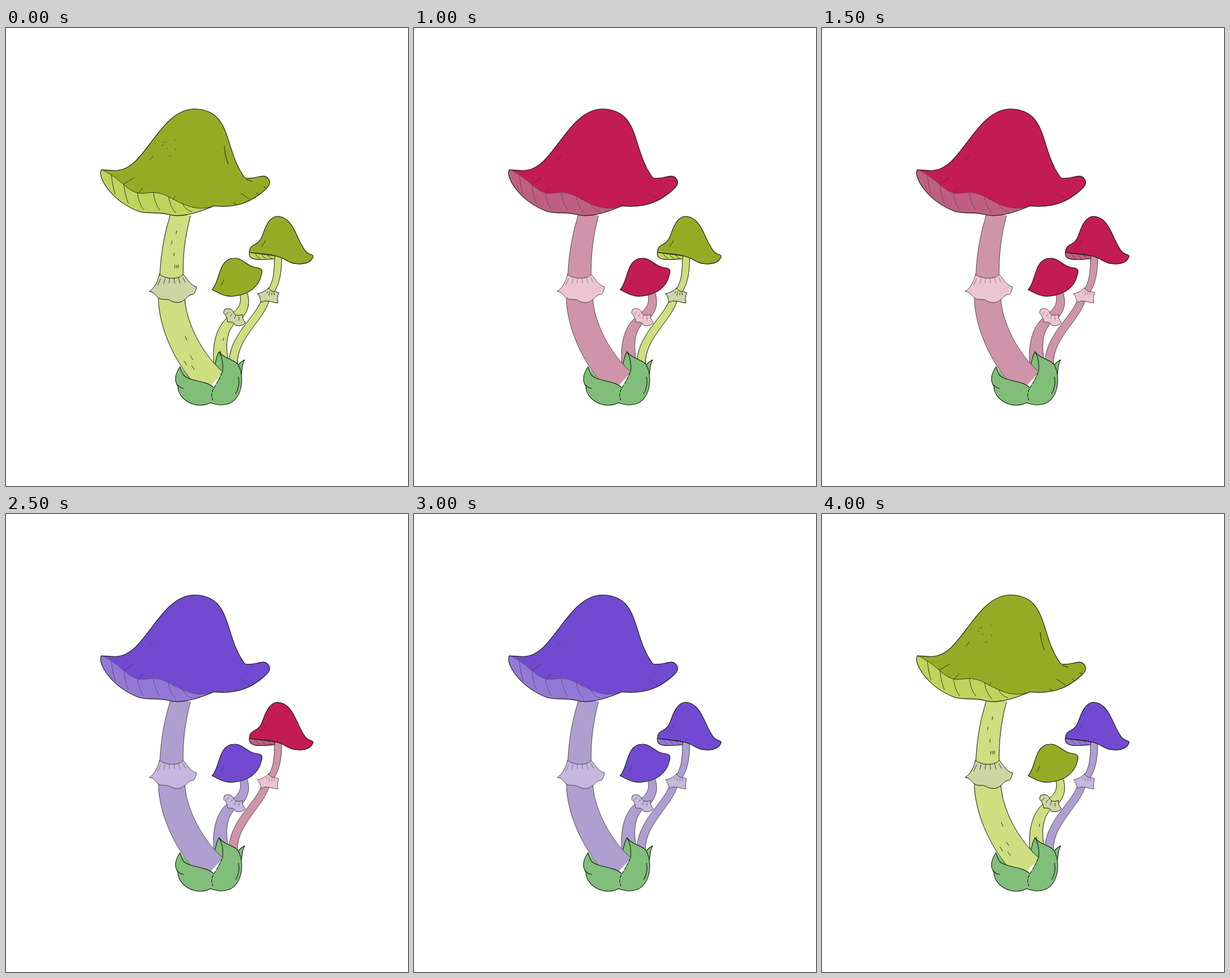
These frames come from a looping animation (702 px wide and 798 px high, 4500 ms). An HTML page:

```html
<!DOCTYPE html>
<html lang="en">
<head>
<meta charset="utf-8">
<title>Colour-changing mushrooms</title>
<style>
  html, body { margin: 0; width: 100%; height: 100%; overflow: hidden; background: #fff; }
  svg { display: block; width: 100%; height: 100%; }
  path { fill: none; stroke-linecap: round; stroke-linejoin: round; }
  .cap { fill: var(--cap); }
  .gills { fill: var(--gills); }
  .stem { fill: var(--stem); }
  .ring { fill: var(--ring); }
  .leaf { fill: #80be79; }
  .line, .side, .soft, .fine { stroke: #14180f; }
  .line { stroke-width: 1.1; }
  .side { stroke-width: var(--side); }
  .soft { stroke-width: .8; opacity: var(--soft); }
  .fine { stroke-width: .9; opacity: var(--fine); }
  .broken { stroke-dasharray: 5 3; }
</style>
</head>
<body>
<svg viewBox="0 0 702 798">
  <g id="right"></g>
  <g id="middle"></g>
  <g id="leavesBack"></g>
  <g id="big"></g>
  <g id="leavesFront"></g>
</svg>
<script>
const byId = id => document.getElementById(id);
const mix = (a, b, t) => a + (b - a) * t;

let seed = 7;
const random = () => (seed = seed * 16807 % 2147483647) / 2147483647;

function draw(group, cls, d) {
  const path = document.createElementNS('http://www.w3.org/2000/svg', 'path');
  path.setAttribute('class', cls);
  path.setAttribute('d', d);
  byId(group).append(path);
  return path;
}

// Tapered stalk around a curved spine; only its two sides are inked.
function stalk(group, spine, startWidth, endWidth, flecks) {
  const guide = draw(group, '', spine);
  const length = guide.getTotalLength();
  const at = (t, across) => {
    const a = guide.getPointAtLength(length * Math.max(0, t - .01));
    const b = guide.getPointAtLength(length * Math.min(1, t + .01));
    const p = guide.getPointAtLength(length * t);
    const reach = across * mix(startWidth, endWidth, t) / 2 / Math.hypot(b.x - a.x, b.y - a.y);
    return [p.x + (b.y - a.y) * reach, p.y - (b.x - a.x) * reach].map(v => v.toFixed(1));
  };
  const side = across => Array.from({ length: 25 }, (_, i) => at(i / 24, across));
  const left = side(-1), right = side(1);
  draw(group, 'stem', `M${left.join('L')}L${right.reverse().join('L')}Z`);
  draw(group, 'side', `M${left.join('L')}M${right.join('L')}`);
  for (let i = 0; i < flecks; i++) {
    const t = mix(.2, .85, random()), across = mix(-.7, .7, random());
    draw(group, 'fine', `M${at(t, across)}L${at(t + .045, across)}`);
  }
}

// Short folds along the top edge of a ring, fanning out from an apex.
function pleats(group, count, [ax, ay], [bx, by], [apexX, apexY], length) {
  for (let i = 0; i < count; i++) {
    const x = mix(ax, bx, i / (count - 1)), y = mix(ay, by, i / (count - 1));
    const reach = length * mix(.6, 1.1, random()) / Math.hypot(x - apexX, y - apexY);
    draw(group, 'soft', `M${x},${y}l${(x - apexX) * reach},${(y - apexY) * reach}`);
  }
}

// Right mushroom
stalk('right', 'M453,474C442,508 394,540 397,588', 13, 15, 0);
stalk('right', 'M475,397C475,422 474,440 463,458', 13, 11, 0);
draw('right', 'ring side', 'M458,453C453,459 447,461 439,463C444,468 444,474 446,478C456,472 464,479 475,479C473,470 475,466 476,461L469,459Q463,460 458,453Z');
pleats('right', 4, [457, 459], [468, 461], [465, 445], 6);
draw('right', 'gills line', 'M425,391C423,405 440,405 469,402L470,397Z');
for (let x = 435; x < 460; x += 10) draw('right', 'soft', `M${x},393q3,6 9,9`);
draw('right', 'cap line', 'M425,391C426,372 441,384 449,358C456,338 463,329 474,328C504,329 508,374 525,391C529,395 538,394 536,399C531,413 505,415 488,404C472,394 450,394 425,391Z');
draw('right', 'soft', 'M446,381Q451,376 453,370');

// Middle mushroom
stalk('middle', 'M395,508C376,524 370,552 377,592', 16, 27, 2);
stalk('middle', 'M415,464C420,482 412,494 403,502', 13, 18, 0);
draw('middle', 'ring side', 'M382,490C392,487 396,491 398,497C402,502 408,501 413,499C412,507 416,509 418,514C412,520 406,519 401,518C398,511 392,513 387,512C386,503 383,500 380,497Z');
pleats('middle', 4, [389, 495], [407, 503], [408, 480], 7);
draw('middle', 'cap line', 'M360,456C374,442 370,402 398,401C414,400 420,416 440,418C448,419 448,424 446,430C442,450 425,463 405,466C385,471 372,462 360,456Z');
draw('middle', 'soft', 'M375,449Q379,444 380,439');

draw('leavesBack', 'leaf line', 'M405,588C409,582 413,580 417,578C411,588 413,594 411,603');
draw('leavesBack', 'leaf', 'M372,564C366,574 367,582 364,587L378,603L385,575Z');
draw('leavesBack', 'line', 'M372,564C366,574 367,582 364,587');
draw('leavesBack', 'leaf', 'M304,590L330,622L309,606Z');

// Big mushroom
stalk('big', 'M289,466C289,515 318,578 362,618', 46, 50, 4);
stalk('big', 'M306,322C296,355 289,392 289,436', 34, 41, 6);
draw('big', 'ring side', 'M268,429C264,445 258,454 250,459C262,460 262,473 275,473C288,471 288,480 303,478C318,473 315,465 327,464C329,464 332,456 333,451C322,449 317,437 309,429C303,439 277,438 268,429Z');
pleats('big', 6, [270, 437], [309, 435], [289, 395], 12);

const underside = 'M167,247C158,255 180,300 233,320C250,324 265,320 285,325C305,331 335,322 363,310';
const dome = 'M167,247C175,247 185,249 195,248C244,245 268,141 330,141C396,143 380,212 417,261C436,266 450,250 459,264C463,270 458,277 452,282C428,304 402,314 363,310';
const rim = 'C330,322 306,305 280,292C262,284 254,287 240,288C214,291 203,262 167,247';
draw('big', 'gills', underside + rim);
draw('big', 'cap', dome + rim);
const lower = draw('big', 'line', underside);
const upper = draw('big', 'soft', 'M363,310' + rim);
draw('big', 'line', dome);

// Gills lean from the rim towards the underside.
const along = (path, t) => path.getPointAtLength(path.getTotalLength() * t);
for (let i = 0; i < 6; i++) {
  const a = along(upper, .91 - .13 * i), b = along(lower, .24 + .12 * i);
  const x = mix(a.x, b.x, .85), y = mix(a.y, b.y, .85);
  draw('big', 'soft', `M${a.x},${a.y}Q${a.x + 2},${mix(a.y, y, .6)} ${x},${y}`);
}

draw('big', 'soft', 'M251,230L257,223M205,272Q214,267 223,261M231,287L239,279M292,299L295,293M410,288L425,298');
draw('big', 'fine', 'M381,206Q382,222 388,237M398,304L402,308M437,287L442,291M450,277L454,278M420,264L430,267');
for (let i = 0; i < 9; i++) {
  draw('big', 'fine', `M${mix(258, 298, random())},${mix(192, 226, random())}l1,1`);
}

draw('leavesFront', 'leaf', 'M304,590C293,606 295,616 300,624C301,650 334,665 357,653L363,627C350,613 322,617 310,605Z');
draw('leavesFront', 'line', 'M363,627C350,613 322,617 310,605Q306,599 304,590C293,606 295,616 300,624C301,650 334,665 357,653M300,622Q303,627 310,628');
draw('leavesFront', 'leaf', 'M372,564C382,578 399,576 406,588C419,612 412,672 357,653Q359,640 363,627C380,598 383,580 372,564Z');
draw('leavesFront', 'line', 'M378,600C380,584 378,574 372,564C382,578 399,576 406,588C419,612 412,672 357,653M406,608Q409,624 401,637');
draw('leavesFront', 'line broken', 'M377,601Q373,612 363,627Q357,638 361,648');

const palettes = {
  green:  { cap: '#96ab25', gills: '#bfd45c', stem: '#cede80', ring: '#cdd5a5', side: 1, soft: 1, fine: 1 },
  red:    { cap: '#c31b54', gills: '#be5f82', stem: '#cf94a9', ring: '#ecc5d2', side: .7, soft: .5, fine: 0 },
  purple: { cap: '#714ad1', gills: '#9478d5', stem: '#ad9fd0', ring: '#c5b7de', side: .7, soft: .5, fine: 0 }
};
const colours = Object.keys(palettes);
const mushrooms = ['big', 'middle', 'right'];
const stepTime = 500;
const stepCount = colours.length * mushrooms.length;

function paint(id, name) {
  for (const [key, value] of Object.entries(palettes[name])) byId(id).style.setProperty('--' + key, value);
}

let shown = -1;
const start = performance.now();
function tick() {
  const step = Math.floor((performance.now() - start) / stepTime) % stepCount;
  if (step !== shown) {
    shown = step;
    // Each mushroom takes the next colour one step after its larger neighbour.
    mushrooms.forEach((id, delay) => paint(id, colours[Math.floor((step + 2 - delay) / 3) % colours.length]));
  }
  requestAnimationFrame(tick);
}
tick();
</script>
</body>
</html>
```
